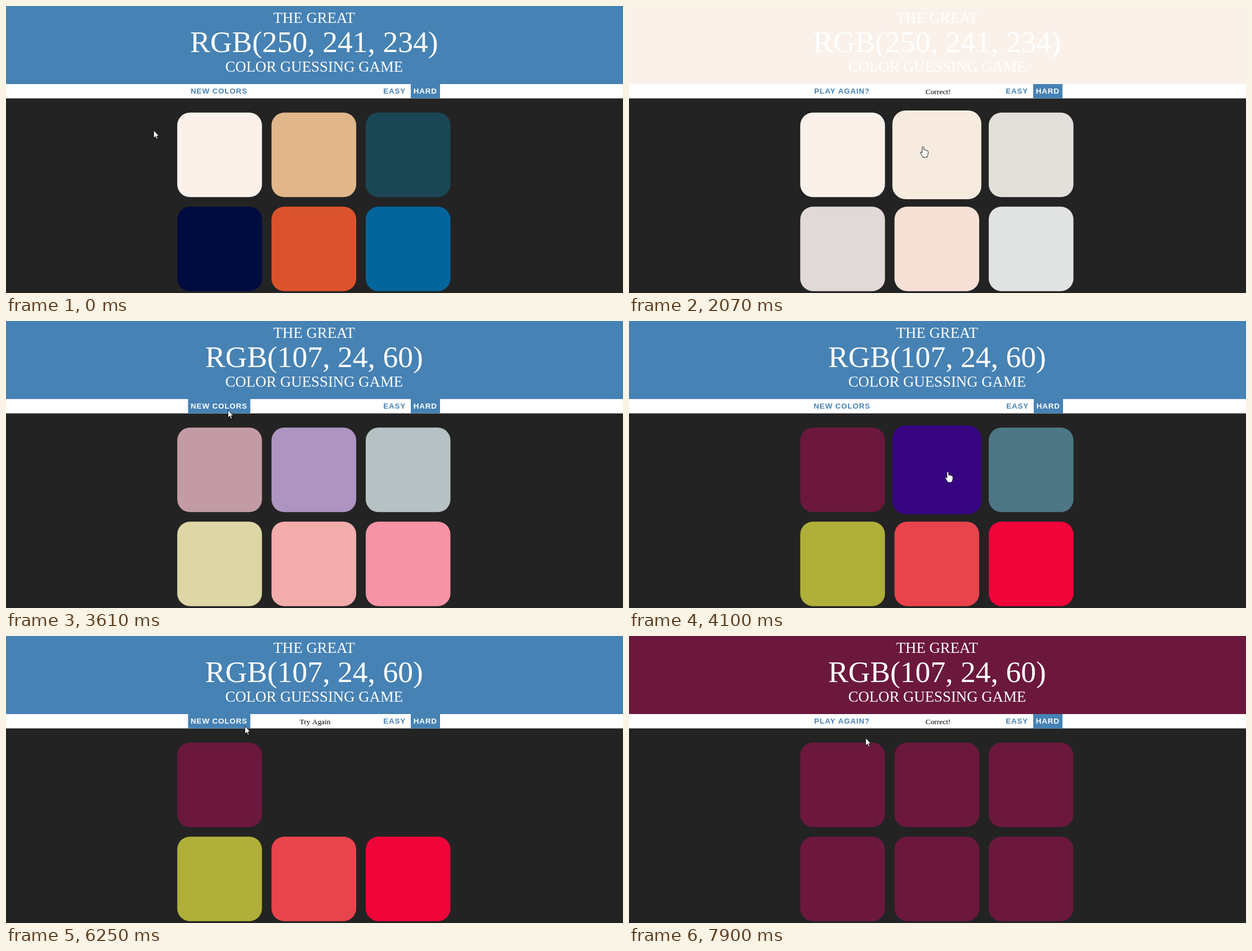
An HTML page with a canvas that plays this animation: 1096x511 px, repeating every 8000 ms.

```html
<!DOCTYPE html>
<html lang="en">
<head>
<meta charset="utf-8">
<title>Color Guessing Game</title>
<style>
  html, body { margin: 0; width: 100%; height: 100%; overflow: hidden; background: #232323; }
  canvas { display: block; }
</style>
</head>
<body>
<canvas id="stage" width="1096" height="511"></canvas>
<script>
const ctx = document.getElementById('stage').getContext('2d');
const LOOP = 8000, TICK = 97.5;   // the screen refreshes once per tick
const FADE = 600 / TICK;
const BLUE = '#4682b4', DARK = '#232323', CREAM = '#faf1ea', WINE = '#6b183c';
const SERIF = '"Liberation Serif", "Times New Roman", serif';
const SANS = '"Liberation Sans", Arial, sans-serif';

const CENTER = 547.3, SIZE = 150.5, PITCH = 167.4;
const BAR = { top: 139, bottom: 164.5 };
const RESET = { left: 323.4, width: 110.6 };

const FIRST = [CREAM, '#e1b68a', '#1b4755', '#000b3f', '#db532c', '#04659d'];
const SECOND = [WINE, '#370582', '#4e7786', '#afaf39', '#e9434d', '#f00439'];
const all = color => Array(6).fill(color);

// Each click fades some squares and switches parts of the page.
const START = { title: CREAM, header: BLUE, message: '', won: false };
const win = color => ({ header: color, message: 'Correct!', won: true });
const CLICKS = [
  { at: 17.2, squares: all(CREAM), page: win(CREAM) },
  { at: 35.5, squares: SECOND, page: { ...START, title: WINE } },
  { at: 45.4, squares: { 1: DARK }, page: { message: 'Try Again' } },
  { at: 52.6, squares: { 2: DARK }, page: {} },
  { at: 70.4, squares: all(WINE), page: win(WINE) }
];

// Pointer movements between rests
const MOVES = [
  { from: 7, to: 12, x: 385, y: 263 },
  { from: 17, to: 23, x: 570, y: 246 },
  { from: 26, to: 32, x: 394, y: 158 },
  { from: 37, to: 42, x: 566, y: 268 },
  { from: 45, to: 49, x: 712, y: 268 },
  { from: 52, to: 57, x: 734, y: 447 },
  { from: 61, to: 64, x: 424, y: 160 },
  { from: 64, to: 66, x: 419, y: 283 },
  { from: 78, to: 80.5, x: 420, y: 181 }
];

const mix = (a, b, p) => a + (b - a) * p;
const clamp = p => Math.min(1, Math.max(0, p));
const smooth = p => p * p * (3 - 2 * p);
const channels = hex => [1, 3, 5].map(i => parseInt(hex.slice(i, i + 2), 16));

// The CSS "ease" curve
function ease(x) {
  const curve = (a, b, s) => 3 * a * s * (1 - s) ** 2 + 3 * b * s * s * (1 - s) + s ** 3;
  let low = 0, high = 1;
  for (let i = 0; i < 24; i++) {
    const mid = (low + high) / 2;
    if (curve(.25, .25, mid) < x) low = mid; else high = mid;
  }
  return curve(.1, 1, low);
}

function pointerAt(tick) {
  let x = 262, y = 221;
  for (const move of MOVES) {
    const p = smooth(clamp((tick - move.from) / (move.to - move.from)));
    x = mix(x, move.x, p);
    y = mix(y, move.y, p);
  }
  return { x, y };
}

const inside = (p, left, top, right, bottom) =>
  p.x >= left && p.x <= right && p.y >= top && p.y <= bottom;

const SQUARES = all().map((_, i) => ({
  left: 304.2 + (i % 3) * PITCH,
  top: 189.8 + Math.floor(i / 3) * PITCH
}));
const squareUnder = point => SQUARES.findIndex(({ left, top }) =>
  inside(point, left, top, left + SIZE, top + SIZE));

function stateAt(tick) {
  const page = { ...START };
  const colors = FIRST.map(channels);
  for (const click of CLICKS.filter(c => c.at <= tick)) {
    Object.assign(page, click.page);
    const p = ease(clamp((tick - click.at) / FADE));
    for (const i in click.squares) {
      const goal = channels(click.squares[i]);
      colors[i] = colors[i].map((v, k) => mix(v, goal[k], p));
    }
  }
  return { ...page, colors };
}

function text(string, x, y, font, color, align = 'center') {
  ctx.font = font;
  ctx.fillStyle = color;
  ctx.textAlign = align;
  ctx.fillText(string, x, y);
}

function bar(left, width, color) {
  ctx.fillStyle = color;
  ctx.fillRect(left, BAR.top, width, BAR.bottom - BAR.top);
}

function button(label, left, width, filled) {
  if (filled) bar(left, width, BLUE);
  ctx.letterSpacing = '0.84px';
  text(label, left + 4.7, 156.2, `bold 13.4px ${SANS}`, filled ? '#fff' : BLUE, 'left');
  ctx.letterSpacing = '0px';
}

const ARROW = new Path2D('M0 0V14L3.2 11L5.5 16L7.7 15.1L5.5 10.4H9.7Z');
const HAND = new Path2D(
  'M-1.6 1.2Q0 -.8 1.6 1.2V6Q3.2 5 4.3 6.6Q5.8 5.8 6.7 7.4Q8.8 6.8 9 9' +
  'V13Q9 15.5 7.3 17V19H-.6V17.5Q-2.2 15.5 -4.6 11.6Q-5.2 9.6 -3.4 9.6L-1.6 11.4Z');

function drawPointer({ x, y }, shape) {
  ctx.save();
  ctx.translate(Math.round(x) + .3, Math.round(y) + .3);
  ctx.fillStyle = '#fff';
  ctx.strokeStyle = '#000';
  ctx.lineWidth = .9;
  ctx.fill(shape);
  ctx.stroke(shape);
  ctx.restore();
}

function draw(tick) {
  const state = stateAt(tick);
  const pointer = pointerAt(tick);
  const hovered = squareUnder(pointerAt(tick - .6));   // hover trails the pointer slightly

  ctx.fillStyle = DARK;
  ctx.fillRect(0, 0, 1096, 511);
  ctx.fillStyle = state.header;
  ctx.fillRect(0, 0, 1096, BAR.top);
  bar(0, 1096, '#fff');

  text('THE GREAT', CENTER, 29.5, `26.8px ${SERIF}`, '#fff');
  text(`RGB(${channels(state.title).join(', ')})`, CENTER, 82.1, `53.6px ${SERIF}`, '#fff');
  text('COLOR GUESSING GAME', CENTER, 117.4, `26.8px ${SERIF}`, '#fff');

  const overReset = inside(pointer, RESET.left, BAR.top, RESET.left + RESET.width, BAR.bottom);
  const shift = state.won ? 1 : 0;
  button(state.won ? 'PLAY AGAIN?' : 'NEW COLORS', RESET.left + shift, RESET.width, overReset);
  button('EASY', 665.6 - shift, 50, false);
  button('HARD', 719 - shift, 52, true);
  text(state.message, 549, 156.6, `13.4px ${SERIF}`, '#000');

  SQUARES.forEach(({ left, top }, i) => {
    const scale = i === hovered ? 1.05 : 1;
    const size = SIZE * scale, grow = (size - SIZE) / 2;
    ctx.fillStyle = `rgb(${state.colors[i].map(Math.round)})`;
    ctx.beginPath();
    ctx.roundRect(left - grow, top - grow, size, size, size * .15);
    ctx.fill();
  });

  drawPointer(pointer, squareUnder(pointer) < 0 ? ARROW : HAND);
}

const begin = performance.now();
function frame() {
  draw(Math.floor((performance.now() - begin) % LOOP / TICK));
  requestAnimationFrame(frame);
}
frame();
</script>
</body>
</html>
```
